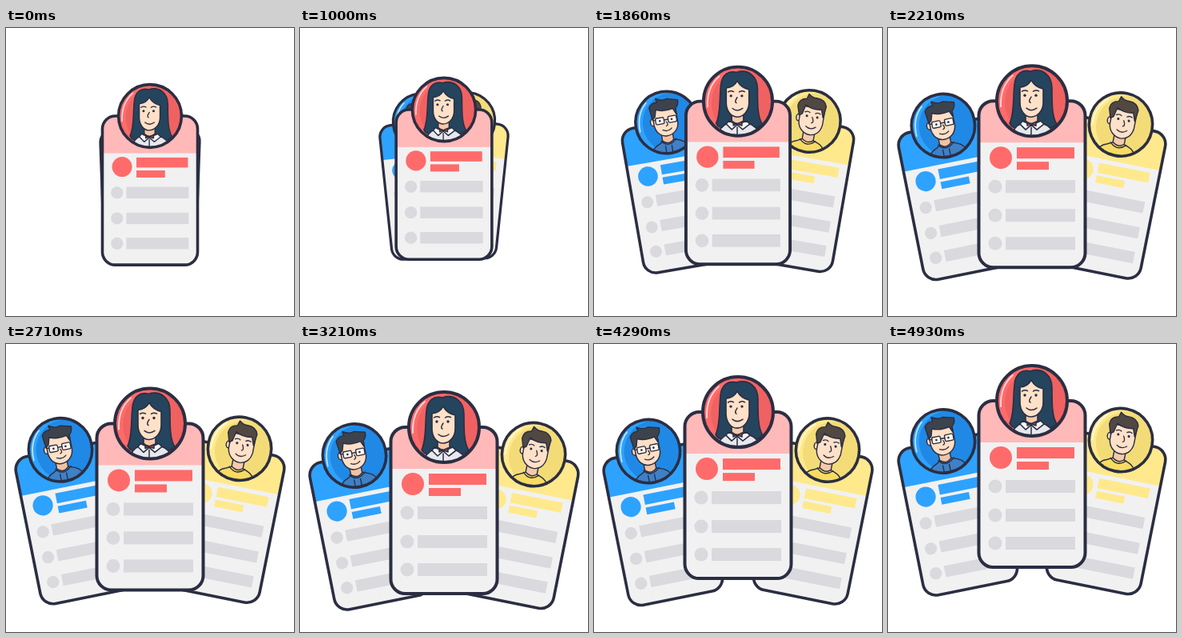
An HTML page that plays this animation: 360x360 px, repeating every 5000 ms.

```html
<!DOCTYPE html>
<html lang="en">
<head>
<meta charset="utf-8">
<title>Profile cards</title>
<style>
html, body { margin: 0; width: 100%; height: 100%; overflow: hidden; background: #fff; }
svg { display: block; width: 100vw; height: 100vh; }
.ink { fill: none; stroke: #2b2e42; stroke-width: 1.5; stroke-linecap: round; stroke-linejoin: round; }
.part { stroke: #2b2e42; stroke-width: 1.6; stroke-linejoin: round; }
.frame { fill: none; stroke: #2b2e42; stroke-width: 4; }
.dot { fill: #2b2e42; }
</style>
</head>
<body>
<svg id="stage" viewBox="0 0 360 360">
  <defs>
    <clipPath id="disc"><circle r="44"/></clipPath>
    <clipPath id="sheet"><rect x="-66.5" width="133" height="208" rx="18"/></clipPath>
  </defs>
</svg>
<script>
const LOOP = 5000, FPS = 14;
const stage = document.getElementById('stage');

const eyes = (x1, x2, y) => [x1, x2].map(x =>
  `<circle class="dot" cx="${x}" cy="${y}" r="1.7"/>
   <path class="ink" d="M${x - 3.5} ${y - 5}q3.5-2.4 7-.3"/>`).join('');

const woman = `
  <path d="M-22-20C-21-34-12-40-2-37C13-42 25-32 25-16C25 4 25 20 31 29Q23 36 13 34L-16 34Q-25 35-28 28C-22 16-24-2-22-20Z" fill="#25445d" class="part"/>
  <path d="M-25 46Q-25 33-13 28L-7 25H7L13 28Q27 33 28 46Z" fill="#e7e8ec" class="part"/>
  <path d="M-8 14H7V25Q0 32-8 25Z" fill="#f6c9ab" class="part"/>
  <path d="M-15-17Q-5-18-1-26Q4-17 14-15V2C14 13 6 20-1 20C-9 20-15 12-15 2Z" fill="#ffe1c8" class="part"/>
  <path d="M-12 25L-1 30L-8 36L-15 29ZM11 25L-1 30L6 36L15 29Z" fill="#f7f7f8" class="part"/>
  <path d="M-6 27L5 31V26L-6 31Z" fill="#8d4a4d" class="ink" style="fill:#8d4a4d"/>
  <path class="ink" d="M-1 33V46M-1-5Q-5 1-2 2M-7 9Q-1 14 6 9"/>
  ${eyes(-9, 5, -7)}`;

const coder = `
  <path d="M-29 46Q-27 33-15 29L-8 25H7L15 28Q25 32 28 46Z" fill="#3f80c6" class="part"/>
  <path d="M-10 12H6V25Q-2 33-10 25Z" fill="#f2c2a2" class="part"/>
  <path d="M-12 25Q-3 37 10 25M-7 33V42M2 33V42" class="ink"/>
  <ellipse cx="-19" cy="-3" rx="3.5" ry="5" fill="#ffdabf" class="part"/>
  <path d="M-18-20H16V2C15 13 7 19-2 19C-11 19-17 12-18 2Z" fill="#ffdfc5" class="part"/>
  <path d="M-19-7L-21-24Q-17-31-9-30L-10-36Q-1-30 6-33L21-29Q21-21 16-18V-9L12-18Q-2-15-12-20L-15-10Z" fill="#3d434d" class="part"/>
  <g class="ink"><rect x="-15" y="-8" width="12" height="9" rx="2" style="fill:#fff5eb"/>
  <rect x="3" y="-8" width="12" height="9" rx="2" style="fill:#fff5eb"/>
  <path d="M-3-4H3M-15-5L-19-6M0-1Q3 4-1 5M-7 10Q0 14 6 9"/></g>
  <circle class="dot" cx="-9" cy="-3.5" r="1.5"/><circle class="dot" cx="8" cy="-3.5" r="1.5"/>`;

const friend = `
  <path d="M-27 46Q-25 34-13 30L-5 26H9L17 29Q27 33 29 46Z" fill="#f7dc62" class="part"/>
  <path d="M-6 12H10V26Q3 33-6 26Z" fill="#f6c9ab" class="part"/>
  <path d="M-9 27Q2 38 13 27M-17 39V46M20 38V46" class="ink"/>
  <ellipse cx="-16" cy="-3" rx="3.5" ry="5" fill="#ffdabf" class="part"/>
  <path d="M-15-20H19V2C18 13 11 19 3 19C-6 19-14 12-15 2Z" fill="#ffe1c8" class="part"/>
  <path d="M-16-6L-20-19Q-20-29-9-31L-7-38Q-1-33 5-34Q17-34 20-24L18-8L14-19Q1-16-9-22L-12-9Z" fill="#514842" class="part"/>
  <path class="ink" d="M3-6Q7 1 3 2M-4 8Q3 13 10 7"/>
  ${eyes(-5, 10, -7)}`;

const row = y => `<circle cx="-46" cy="${y}" r="8.5"/><rect x="-33" y="${y - 8}" width="87" height="16"/>`;

function card(person, main, head, shade) {
  const g = document.createElementNS('http://www.w3.org/2000/svg', 'g');
  g.innerHTML = `
    <g clip-path="url(#sheet)">
      <rect x="-68" width="136" height="208" fill="#f1f1f2"/>
      <rect x="-68" width="136" height="52" fill="${head}"/>
    </g>
    <g fill="${main}">
      <circle cx="-39" cy="71" r="14"/>
      <rect x="-19" y="58" width="72" height="14"/>
      <rect x="-19" y="76" width="40" height="10"/>
    </g>
    <g fill="#d9d9de">${[107, 143, 178].map(row).join('')}</g>
    <rect class="frame" x="-66.5" width="133" height="208" rx="18"/>
    <g clip-path="url(#disc)">
      <circle r="45" fill="${main}"/>
      <circle cx="9" cy="2" r="43" fill="${shade}"/>
      <path d="M-39 7Q-40-18-24-32" fill="none" stroke="#fff" stroke-opacity=".75" stroke-width="1.8" stroke-linecap="round"/>
      ${person}
    </g>
    <circle class="frame" r="44"/>`;
  stage.append(g);
  return g;
}

const left = card(coder, '#2ea2ff', '#2ea2ff', '#2089e6');
const right = card(friend, '#ffe98c', '#ffe98c', '#f3dc78');
const mid = card(woman, '#ff6b6b', '#ffb9b9', '#f06262');

// Smooth curve through [time, value] points, flat at turning points
function curve(points) {
  const gap = points.slice(1).map((p, i) => (p[1] - points[i][1]) / (p[0] - points[i][0]));
  const slope = points.map((p, i) => {
    const a = gap[i - 1] ?? gap[i], b = gap[i] ?? a;
    return a * b <= 0 ? 0 : 2 * a * b / (a + b);
  });
  return t => {
    let i = 0;
    while (i < points.length - 2 && t > points[i + 1][0]) i++;
    const [t0, v0] = points[i], [t1, v1] = points[i + 1];
    const h = t1 - t0, u = (t - t0) / h, w = 1 - u;
    return v0 * w * w * (1 + 2 * u) + v1 * u * u * (3 - 2 * u)
      + h * u * w * (slope[i] * w - slope[i + 1] * u);
  };
}

const midY = curve([[0, 110], [570, 107], [1000, 102], [1500, 95], [1710, 92.5], [2140, 90.8],
  [2290, 92], [2860, 101.5], [3210, 104], [4000, 93.5], [4290, 85], [4570, 77], [4930, 71]]);
const sideY = curve([[0, 127], [570, 123], [1000, 117.5], [1400, 116], [1710, 117], [2210, 122],
  [2860, 135], [3210, 139.5], [3580, 142], [4000, 139], [4290, 134], [4570, 129], [4930, 121.5]]);
const spread = curve([[0, 9], [570, 15], [1000, 28], [1140, 35], [1500, 59.5], [1710, 77],
  [2210, 111], [2500, 112], [4290, 112], [4930, 111]]);
const tilt = curve([[0, 2], [570, 3.5], [1000, 6], [1500, 7.8], [1710, 9], [2210, 11.3], [4930, 11.3]]);
const size = curve([[0, .895], [1000, .9], [1500, .943], [1710, .965], [2210, 1], [4930, 1]]);

const place = (g, x, y, angle, scale) =>
  g.setAttribute('transform', `translate(${x} ${y}) rotate(${angle}) scale(${scale})`);

function draw(ms) {
  const t = Math.floor((ms % LOOP + 5) * FPS / 1000) % (LOOP * FPS / 1000) * 1000 / FPS;
  const s = size(t), x = spread(t), y = sideY(t), a = tilt(t);
  place(left, 180 - x, y, -a, s * .9);
  place(right, 180 + x, y - 1.5, a, s * .9);
  place(mid, 180, midY(t), 0, s);
}

const start = performance.now();
function tick() {
  draw(performance.now() - start);
  requestAnimationFrame(tick);
}
tick();
</script>
</body>
</html>
```
